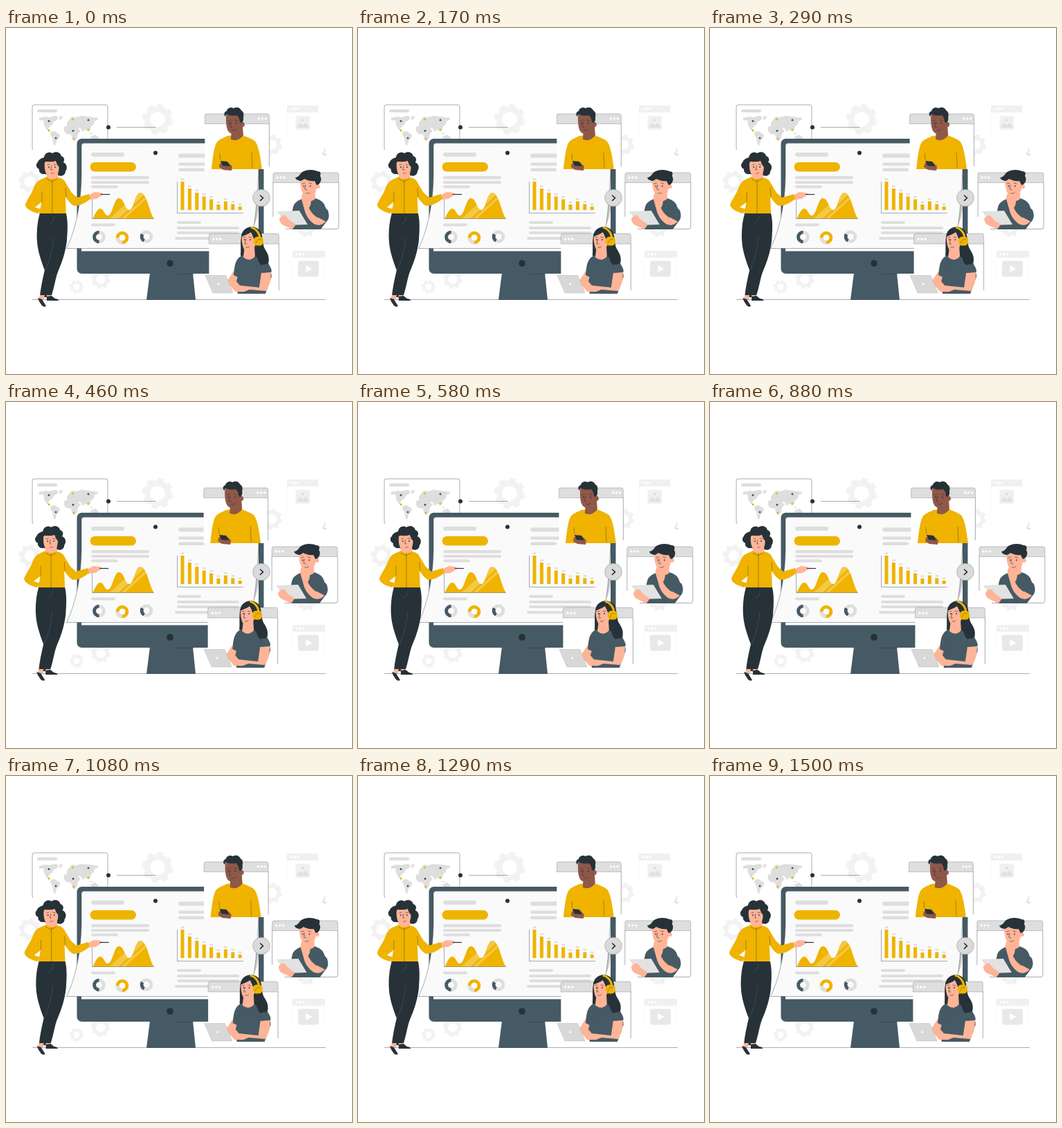
Animation of 500x500 px, one loop 1540 ms. Source, as an HTML page:

```html
<!DOCTYPE html>
<html lang="en">
<head>
<meta charset="utf-8">
<title>Presentation</title>
<style>
html, body { margin: 0; width: 100%; height: 100%; overflow: hidden; background: #fff; }
svg { display: block; width: 100%; height: 100%; }
.dark { fill: #263238; } .slate { fill: #455a64; } .gold { fill: #efb300; }
.grey { fill: #dedede; } .pale { fill: #f0f0f0; } .white { fill: #fff; }
.skin { fill: #ffb498; } .brown { fill: #8f5848; }
.line { fill: none; stroke: #263238; stroke-width: .6; stroke-linecap: round; stroke-linejoin: round; }
.edge { stroke: #263238; stroke-width: .4; }
.thin { fill: none; stroke: #263238; stroke-width: .4; }
.gear circle { fill: none; stroke: #f2f2f2; }
</style>
</head>
<body>
<svg viewBox="0 0 500 500">
  <clipPath id="areaClip">
    <path id="area" d="M125 275.500c4-6 6-14 11-14.500 6 0 6 10 11 10 7 0 9-25 16-25 8 0 9 17 15 17 7 0 8-25 16-25 10 0 13 29 20 37.500z"/>
  </clipPath>

  <g id="gears"></g>

  <g id="faint">
    <rect x="406.500" y="112.500" width="44" height="44" class="white" stroke="#fafafa"/>
    <path class="pale" d="M406 122v-8q0-2 2-2h41q2 0 2 2v8z"/>
    <rect x="418.500" y="127" width="20.500" height="20" rx="2" class="pale"/>
    <path d="M420 144l5-7 4 4 4-5 5 8z" fill="#e0e0e0"/>
    <circle cx="429" cy="133" r="2" fill="#e0e0e0"/>
    <rect x="414.500" y="322.500" width="46" height="42" class="white" stroke="#fafafa"/>
    <path class="pale" d="M414 332v-8q0-2 2-2h43q2 0 2 2v8z"/>
    <rect x="422" y="336.500" width="30" height="23" rx="3" fill="#e8e8e8"/>
    <path class="white" d="M433.500 343l9 5-9 5z"/>
    <text x="457" y="182" font-family="Inter, sans-serif" font-size="13" fill="#ccc">¿</text>
  </g>

  <g id="map">
    <path class="thin" d="M39 176q-1-1-1-3v-59q0-3 3-3h103q3 0 3 3v47"/>
    <rect x="45" y="117.500" width="29" height="4.500" rx="2.200" class="grey"/>
    <path class="grey" d="M48 130l9-2 5 1 10-2 4 2-3 5-4 1-2 5-4 2-2 4 3 2-1 2-5-4-3-6-1-7-6 1z
      M65 150l5-1 8 5-1 5-4 4-2 7-2-1-2-10-3-5z M77 128l5-1-1 4-4 2z
      M88 137l3-4 4-5 6 1 8-2 10 1 15 2-2 3-4 1-1 5-4 3-1 5-3 1 1 3-3-3-4-1-1 4-4-6-4-1-3 1-4-4-6-1-3 2z
      M84 143l8-3 10 2 4 5 2 1-4 5-1 5-4 6-3-2-2-8-7-1-3-4z
      M120 151l4 1 3 2-5-1z M122 157l7-3 5 4-1 4-5-2-5 1z"/>
    <circle cx="148" cy="143.500" r="3" class="dark"/>
    <path class="thin" d="M160 143.500H216"/>
  </g>

  <path class="thin" d="M38 392.500H462"/>
  <g id="monitor">
    <path class="slate" d="M208 354h62l4 39H203z"/>
    <path class="thin" d="M248 355.500H271"/>
    <rect x="102.500" y="160" width="270" height="195" rx="7" class="slate"/>
    <path class="white" d="M109 322.500V170.500q0-4 4-4H361q4 0 4 4v152z"/>
    <path d="M366 250q-2 26-8 36v-32z" fill="#c8c8c8"/>
    <path fill="#fafafa" class="edge" d="M109 215V170.500q0-4 4-4H361q4 0 4 4v34.500c-2 40-4 82-14 113.500H87.500C99 295 108 260 109 215z"/>
    <circle cx="237" cy="340" r="4.800" class="dark"/>
  </g>

  <g id="page">
    <rect x="121.500" y="194" width="66.500" height="13.500" rx="6.700" class="gold"/>
    <circle cx="216" cy="180.500" r="3" class="dark"/>
    <use href="#area" class="gold"/>
    <path d="M149 276l42-38h12l-41 38z M166 276l42-38h5l-42 38z" class="white" opacity=".28" clip-path="url(#areaClip)"/>
    <path class="thin" d="M124.500 241v34.500H214 M247.500 222v45.500H343"/>
  </g>
  <circle cx="369" cy="245.500" r="12.300" fill="#dadada" stroke="#8a9296" stroke-width=".6"/>
  <path d="M367.500 242l4 3.700-4 3.700" class="line" style="stroke-width:1.600"/>

  <g class="shake" id="caller1">
    <path class="white" d="M287.500 138v-11q0-3 3-3h87q3 0 3 3v74q0 3-3 3h-90z"/>
    <path class="thin" d="M380.500 138v62"/>
    <path class="grey edge" stroke-opacity=".6" d="M287.500 138.500v-11.500q0-3 3-3h87q3 0 3 3v11.500z"/>
    <path class="gold" d="M297 204c2-18 4-34 8-39 4-5 10-6 15-9l21-2c7 4 17 6 20 11 5 8 7 24 9 39z"/>
    <path class="thin" d="M309 181l1 10 M355 180q1 14 1 23"/>
    <path class="brown" d="M326 146l16-6 1 15q-7 10-18 6z"/>
    <path class="brown" d="M318 130c0-9 6-12 13-11 9 1 11 8 10 17-1 10-4 17-12 17-9 0-11-9-11-23z"/>
    <circle cx="341.500" cy="139.500" r="3.500" class="brown"/>
    <path class="dark" d="M317 128c-3-4-1-7 2-8 1-5 7-6 10-4 5-3 10 0 11 3 4 2 4 7 3 10 1 4-1 7-2 8l-3-1c0-5-2-8-4-10-5 1-12 1-15-2z"/>
    <path class="line" d="M321 134l4-1 M331 133l4 1 M326 136l-2 7 3 1 M327 148q4 1 6-2"/>
    <circle cx="323" cy="137.500" r=".9" class="dark"/><circle cx="333" cy="137.500" r=".9" class="dark"/>
    <path class="brown" d="M309 196q8-5 13-1l5 5-1 6-12-1-6-4z"/>
    <path class="dark" d="M310 192l10 1 4 7-11-1z"/>
  </g>

  <g class="shake" id="caller2">
    <path class="white" d="M386 223v-11q0-3 3-3h89q3 0 3 3v75q0 3-3 3h-89q-3 0-3-3z"/>
    <path class="thin" d="M386 223v50 M404 290.500h74q3 0 3-3v-64"/>
    <path class="grey edge" stroke-opacity=".6" d="M386 223.500v-11.500q0-3 3-3h89q3 0 3 3v11.500z"/>
    <path class="slate" d="M413 291c0-18 0-33 5-38 4-4 8-5 11-7h18c10 3 13 7 15 14 4 10 5 16 1 20-3 4-6 8-8 11z"/>
    <path class="skin" d="M429 238h18v9q-9 7-18 1z"/>
    <path class="skin" d="M425 217c8-5 21-5 25 1 1 12-2 25-12 27-9 0-13-12-13-28z"/>
    <circle cx="451" cy="229" r="3" class="skin"/>
    <path class="dark" d="M418 216c4 0 6-3 9-7 6-5 17-5 23-2 6 0 5 4 4 7 3 4 1 9-2 12l-3 1-3-6c-6 1-10-1-15-3-2 2-4 3-6 3l-3-1q-3-1-4-4z"/>
    <path class="line" d="M428 225l4-1 M438 224l4 1 M433 227l-1 6 3 1 M433 239q4 1 6-1"/>
    <circle cx="430.500" cy="228.500" r=".9" class="dark"/><circle cx="440" cy="228.500" r=".9" class="dark"/>
    <path class="skin" d="M427 247c0-5 1-8 4-9l8 4 2 6c0 6-1 9-3 12 3 7 7 10 12 14l8-5 7 7c-7 10-14 10-20 7-8-6-12-13-14-22z"/>
    <path class="thin" d="M449 273q8-4 14-12"/>
    <path class="slate" d="M446 271c6-5 9-9 11-15l8 7c3 8 2 13-2 17z"/>
    <path fill="#e2e2e2" d="M392 265l32-1 12 20-29 1z"/>
    <path class="skin" d="M395 276q3-6 9-5l6 7 9 6-5 7-13-6q-5-2-6-9z"/>
  </g>

  <g class="shake" id="caller3">
    <path class="white" d="M293.500 312v-12q0-3 3-3h95q3 0 3 3v80q0 3-3 3h-98z"/>
    <path class="thin" d="M394.500 312v67"/>
    <path class="grey edge" stroke-opacity=".6" d="M293.500 312v-12q0-3 3-3h95q3 0 3 3v12z"/>
    <path class="dark" d="M341 298c4-13 20-14 27-4 4 8 2 17 6 25 6 9 7 14 5 23l-18 5-22-18c1-12-1-21 2-31z"/>
    <path class="slate" d="M330 349c1-10 4-17 11-20l18 1c10 3 17 5 20 10 4 6 4 11 5 19l-9 25h-40z"/>
    <path class="skin" d="M345 316l14-2 1 16q-8 9-17 1z"/>
    <path class="skin" d="M341 298c2-7 14-10 19-4 4 9 2 25-7 29-10 2-13-10-12-25z"/>
    <path class="dark" d="M340 302c1-11 9-15 17-12 10 3 9 15 9 23l6 12c6 8 6 13 6 18-3 0-7 1-10-1-6-8-6-18-7-27-1-8-4-14-7-20-4 3-8 4-14 7z"/>
    <path class="line" d="M343 303l3-1 M351 302l4 1 M347 305l-2 7 3 0 M347 317q4 1 5-1"/>
    <circle cx="345" cy="306" r=".9" class="dark"/><circle cx="353" cy="306" r=".9" class="dark"/>
    <path d="M354 288c8 2 13 9 13 17" fill="none" stroke="#efb300" stroke-width="3"/>
    <rect x="358" y="301.500" width="14" height="13" rx="5.500" class="gold"/>
    <path class="thin" d="M361 311q4-8 8-5"/>
    <path class="skin" d="M369 354l14-1c0 9-1 17-4 21-2 5-4 8-8 8l-40-1-7-9 14 0 28 3z"/>
    <path class="skin" d="M330 350l7 3-4 13 5 6-10 4-9-9 3-5z"/>
    <path class="slate" d="M330 349l4-11 6 14-3 9-8-4z"/>
    <path class="slate" d="M369 354l1-12 9-1q5 6 5 11z"/>
    <path class="slate" d="M342 382l10-4 23 2v4h-34z"/>
    <path fill="#d8d8d8" class="edge" stroke-opacity=".3" d="M288 357.500h30l10 24.500v1h-29z"/>
    <circle cx="307" cy="370" r="1.500" class="white"/>
  </g>

  <g class="shake" id="presenter">
    <path class="dark" d="M55 187c1-7 8-9 12-6 6-4 12-1 13 4 5 2 5 6 3 9 6 3 6 9 3 13 0 6-6 8-10 6-3 4-8 2-11 0l-9-2c-6 1-9-4-8-7-5-2-5-8-2-10 1-3 3-5 9-7z"/>
    <path class="skin" d="M59 208l16 0 1 11q-9 7-17 0z"/>
    <path class="skin" d="M56 194c4-5 17-6 20 0 2 9 0 22-9 22-9 0-12-10-11-22z"/>
    <path class="dark" d="M54 198c-1-9 5-12 12-12 9 0 13 6 11 15-3-3-4-6-5-9-4 2-12 1-15 1z"/>
    <path class="line" d="M60 198l3-1 M69 197l4 1 M66 199l-1 6 2 0"/>
    <path d="M65 210q3 1 5-1" fill="none" stroke="#c0392b" stroke-width=".8"/>
    <circle cx="62" cy="201" r=".9" class="dark"/><circle cx="71" cy="201" r=".9" class="dark"/>
    <path class="skin" d="M46 264l7-7 9-1 2 6-7 7-9 0z"/>
    <path class="skin" d="M119 242l9-5 9 1 4 2-4 3-6 4-11 1z"/>
    <path d="M137 240.500H150" stroke="#263238" stroke-width="1.200"/>
    <path class="gold" d="M50 219l9-4c4 4 11 4 16 1 6 1 9 3 11 7l9 15 8 7 17-5 2 7c-9 7-16 10-23 10-4-1-8-6-13-13l1 26-38-1 2-17-9 7 9 3-5 6c-10-3-17-7-18-12 0-4 7-13 11-22 3-8 6-13 11-15z"/>
    <path class="thin" d="M67 219v49 M52 237v14 M86 231l1 13 M59 218l7 4 8-4"/>
    <path class="dark" d="M49 268h38c3 12 2 26 1 40-2 15-6 28-12 42-5 12-6 26-11 39H49c1-13 4-26 7-39-6-16-10-28-11-42-1-16 1-30 4-40z"/>
    <path d="M69 303q-2 25-12 47 M70 272q-1 9-7 11" fill="none" stroke="#52616a" stroke-width=".5"/>
    <path class="skin" d="M49 386h7l-1 6h-7z M59 386h7l1 4h-8z"/>
    <path class="dark" d="M46 390l6 2 5 8 1 2q-3 2-6-1l-4-6z M59 388l7-1 5 4q6 1 5 3H59z"/>
  </g>
</svg>
<script>
const NS = "http://www.w3.org/2000/svg";
const byId = id => document.getElementById(id);

function add(parent, tag, attrs) {
  const node = document.createElementNS(NS, tag);
  for (const name in attrs) node.setAttribute(name, attrs[name]);
  return parent.appendChild(node);
}
const bar = (x, y, width, height, cls = "grey", rx = height / 2) =>
  add(byId("page"), "rect", { x, y, width, height, rx, class: cls });
const dot = (id, cx, cy, r, cls) => add(byId(id), "circle", { cx, cy, r, class: cls });

function gear(cx, cy, r) {
  const g = add(byId("gears"), "g", { class: "gear" });
  add(g, "circle", { cx, cy, r: r * .66, "stroke-width": r * .36 });
  add(g, "circle", { cx, cy, r: r * .89, "stroke-width": r * .22, pathLength: 16, "stroke-dasharray": "1.1 .9" });
}
[[219, 132, 22.5], [34, 222, 16], [384, 169, 15], [434, 288, 14], [137, 363, 14], [102, 374, 10]]
  .forEach(g => gear(...g));

// Text lines on the page
[[123, 180, 48, 6], [123, 214, 84, 4.5], [123, 221, 84, 4], [123, 227.5, 39, 4], [123, 282.5, 35, 4],
 [249, 181.5, 50, 6], [249, 194.5, 50, 4.5], [249, 202.5, 38, 4.5],
 [247, 279, 35, 4], [247, 287, 90, 4], [247, 294, 90, 4], [244, 302, 90, 4]].forEach(b => bar(...b));

[222, 232, 238, 243.5, 247.5, 255, 250.5, 254.5, 258].forEach((top, i) => {
  const x = 252.5 + i * 10.4;
  bar(x, top, 5, 263 - top, "gold", 0);
  bar(x, top - 4.5, 5, 2.5, "grey", 1);
});

// Ring charts: a full ring with one coloured arc on top
function ring(cx, cy, base, color, share, turn) {
  const attrs = { cx, cy, r: 6.9, fill: "none", "stroke-width": 4.8 };
  add(byId("page"), "circle", { ...attrs, stroke: base });
  add(byId("page"), "circle", { ...attrs, stroke: color, pathLength: 100,
    "stroke-dasharray": `${share} 100`, transform: `rotate(${turn} ${cx} ${cy})` });
}
ring(134.5, 302, "#dedede", "#455a64", 50, 90);
ring(168, 303, "#efb300", "#dedede", 25, 90);
ring(203, 301.5, "#dedede", "#455a64", 25, 120);

[[62, 134.5], [119, 133], [97, 148.5], [72, 159]].forEach(p => dot("map", ...p, 1.5, "slate"));
[[96.5, 132], [62, 148], [119, 147], [98, 160]].forEach(p => dot("map", ...p, 1.5, "gold"));

// Title bar buttons
[["caller1", 365.5, 131], ["caller2", 392, 216], ["caller3", 300, 305], ["faint", 412, 117], ["faint", 420, 327]]
  .forEach(([id, x, y]) => { for (let i = 0; i < 3; i++) dot(id, x + i * 5, y, 1.7, "white"); });

// Sideways shake: keyframes every tenth of the cycle, linear in between
const KEYS = [0, -1, 2, -4, 4, -4, 4, -4, 2, -1, 0];
const LOOP = 1540, CYCLE = 1500, LEAD = 22, AMPLITUDE = .77;

function shakeAt(time) {
  const step = Math.floor(time * .024 + .1) / .024;
  const pos = (step + LEAD) / CYCLE % 1 * 10;
  const i = Math.floor(pos);
  return AMPLITUDE * (KEYS[i] + (KEYS[i + 1] - KEYS[i]) * (pos - i));
}

const movers = document.querySelectorAll(".shake");
function draw(now) {
  const x = shakeAt(now % LOOP);
  movers.forEach(m => m.setAttribute("transform", `translate(${x.toFixed(2)} 0)`));
  requestAnimationFrame(() => draw(performance.now()));
}
draw(performance.now());
</script>
</body>
</html>
```
